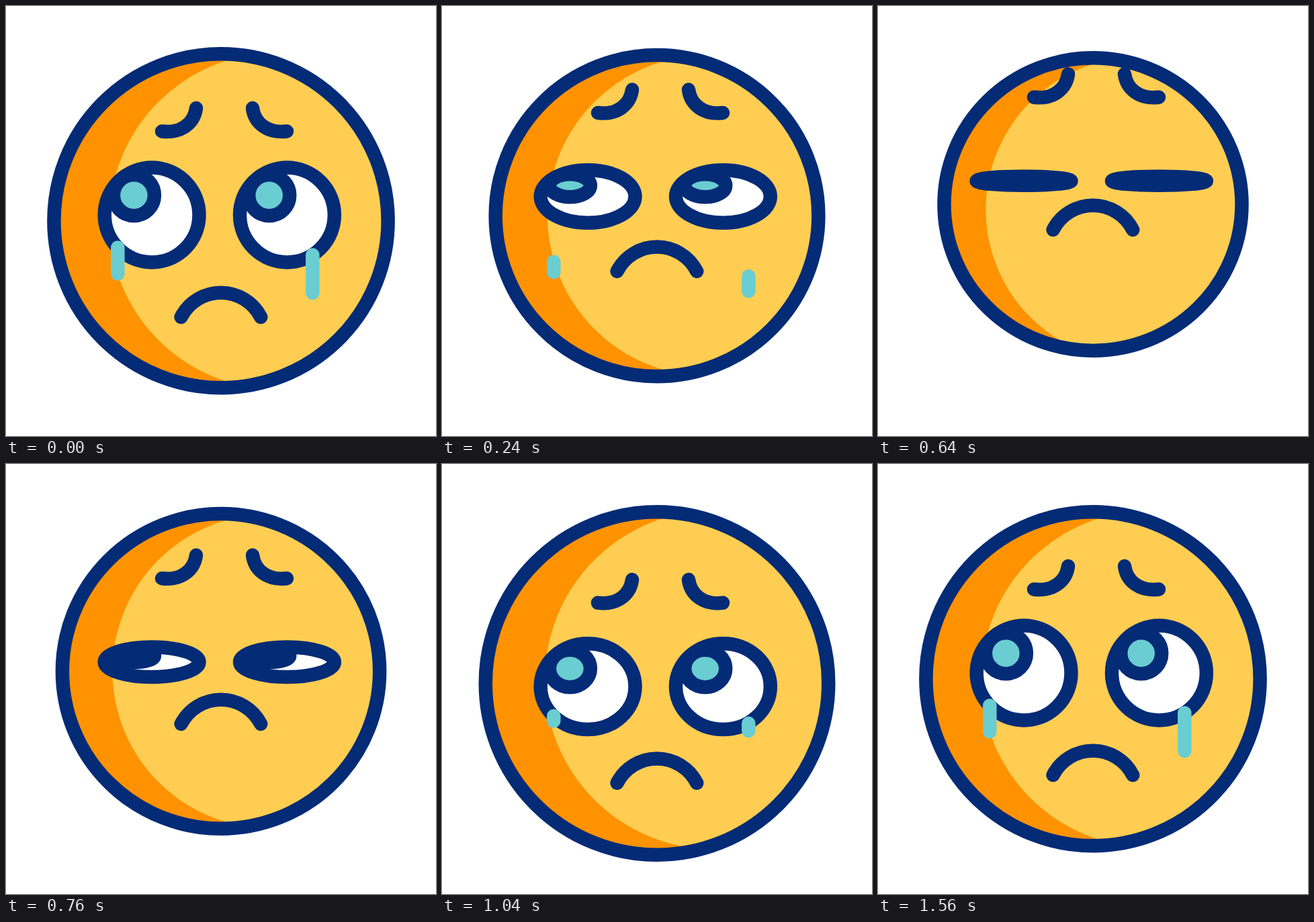
Recreate the animation shown at these times as an HTML page. Size 640 by 640 pixels, loop 2000 ms.

```html
<!DOCTYPE html>
<html lang="en">
<head>
<meta charset="utf-8">
<title>Sad face</title>
<style>
  html, body { margin: 0; width: 100%; height: 100%; overflow: hidden; background: #fff; }
  svg { display: block; width: 100vw; height: 100vh; }
  .line { fill: none; stroke: #042b76; stroke-width: 20.5; stroke-linecap: round; }
  .tear { stroke: #6acdd1; stroke-width: 20.5; stroke-linecap: round; }
</style>
</head>
<body>
<svg viewBox="0 0 640 640">
  <defs>
    <ellipse id="head" cx="320"/>
    <clipPath id="inside"><use href="#head"/></clipPath>
    <path id="brow" d="M283 152C280 175 260 190 232 186.5"/>
  </defs>
  <use href="#head" fill="#ff9200"/>
  <g clip-path="url(#inside)"><circle id="light" fill="#ffcd52"/></g>
  <use href="#head" class="line"/>
  <g id="brows" class="line">
    <use href="#brow"/>
    <use href="#brow" transform="matrix(-1 0 0 1 650 0)"/>
  </g>
  <path id="mouth" class="line" d="M260.6 463A66.6 66.6 0 0 1 379.2 463"/>
  <g id="eye">
    <ellipse id="ball" class="line" cx="217.1" style="fill:#fff"/>
    <ellipse id="iris" class="line" cx="190.4" rx="30.5" style="fill:#6acdd1"/>
  </g>
  <use href="#eye" x="201.3"/>
  <line id="tearL" class="tear" x1="166.3" x2="166.3"/>
  <line id="tearR" class="tear" x1="456.3" x2="456.3"/>
</svg>
<script>
  const LOOP = 2000, STEP = 40;

  // Each track is a list of [time, value] keys
  const tracks = {
    head:   [[40, 0], [600, -58], [945, 15], [1430, 0]],
    light:  [[0, 0], [500, -1.03], [590, -1.03], [1060, 0.08], [1560, 0]],
    face:   [[35, 0], [510, -69], [960, 21.5], [1480, 0]],
    mouth:  [[0, 0], [520, -154], [1020, 11.8], [1580, 0]],
    open:   [[0, 1], [520, 0], [1160, 1]],
    tearY:  [[0, 0], [480, -5], [980, 16], [1520, 0]],
    drain:  [[0, 0], [420, 1]],
    refill: [[937, 0], [1304, 1]]
  };

  const $ = id => document.getElementById(id);
  const ease = x => x * x * (3 - 2 * x);

  function set(id, attrs) {
    for (const name in attrs) $(id).setAttribute(name, attrs[name]);
  }

  function valueAt(keys, t) {
    const i = keys.findIndex(k => k[0] > t);
    if (i === 0) return keys[0][1];
    if (i < 0) return keys[keys.length - 1][1];
    const [t0, a] = keys[i - 1], [t1, b] = keys[i];
    return a + (b - a) * ease((t - t0) / (t1 - t0));
  }

  function drawTear(id, y, length, from, to) {
    set(id, {
      y1: y + length * from,
      y2: y + length * to,
      visibility: to - from > 0.001 ? "visible" : "hidden"
    });
  }

  function draw(t) {
    const v = {};
    for (const name in tracks) v[name] = valueAt(tracks[name], t);

    const top = 71.25 + Math.max(0, -0.11 * v.head);
    const bottom = 568.25 + v.head;
    set("head", {
      cy: (top + bottom) / 2,
      rx: 248.6 + 0.49 * v.head,
      ry: (bottom - top) / 2
    });
    set("light", {
      cx: 404 + 17 * v.light,
      cy: 320 + 17 * v.light,
      r: 250.5 + 24 * v.light
    });

    set("brows", { transform: `translate(0 ${v.face})` });
    set("mouth", { transform: `translate(0 ${v.mouth})` });

    const open = Math.max(v.open, 0.005), eyeY = 311 + v.face;
    set("ball", { cy: eyeY, rx: 70.4, ry: 70.4 * open });
    set("iris", { cy: eyeY - 29.3 * open, ry: 30.5 * open });

    const crying = t < 680;
    const from = crying ? v.drain : 0, to = crying ? 1 : v.refill;
    drawTear("tearL", 359.6 + v.tearY, 39, from, to);
    drawTear("tearR", 370.6 + v.tearY, 56.4, from, to);
  }

  // The small lead keeps early ticks from showing the previous step
  function tick(now) {
    draw(Math.floor((now + 6) / STEP) * STEP % LOOP);
    requestAnimationFrame(tick);
  }

  draw(0);
  requestAnimationFrame(tick);
</script>
</body>
</html>
```
